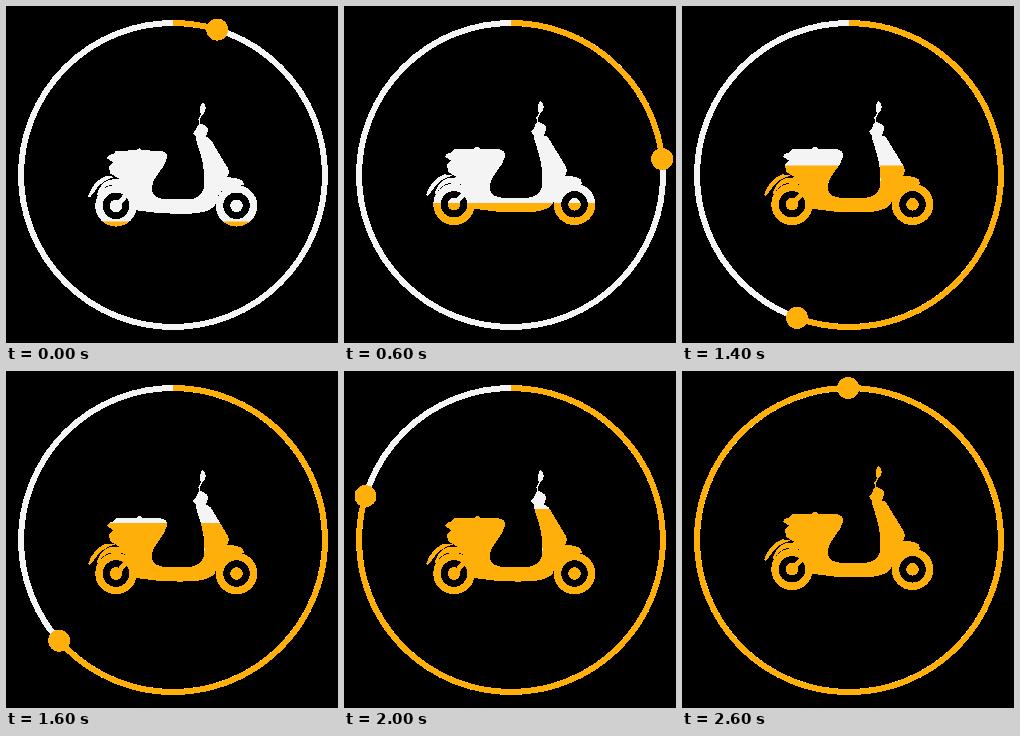
An HTML page for the animation above (2.8 s loop, 332x337 px).

```html
<!DOCTYPE html>
<html>
<head>
<meta charset="utf-8">
<title>Scooter progress ring</title>
<style>
  html, body { margin: 0; width: 100%; height: 100%; overflow: hidden; background: #000; }
  svg { display: block; shape-rendering: crispEdges; }
  .light { color: #f4f4f4; }
  .warm { color: #ffaf0a; }
  .line { fill: none; stroke: currentColor; }
</style>
</head>
<body>
<svg width="332" height="337" viewBox="0 0 332 337">
  <defs>
    <clipPath id="level"><rect id="fill" width="332" height="337"/></clipPath>
    <g id="wheel">
      <circle class="line" r="17" stroke-width="7.5"/>
      <circle r="6.3"/>
    </g>
    <g id="scooter" fill="currentColor">
      <!-- body, leg shield and front fender -->
      <path d="M101 152 Q102 148 107 148 L110 144.500 L130 144 Q131 142 134 142 L136 144 L155 144.500
        Q162 145.500 161 152 C159 162 145.500 172 145.500 182 C145.500 191 153 193.200 165 193.200 L184 193
        Q198 191 198.500 177 C199 164 196 151 191 137 L189.500 130 L187 127 Q190 124 192 118.500
        L195 117 L201 120.500 Q203 124 201 127 L200 130.500 Q205 132 208 139 L222 162 L223 166 L221 171
        Q232 171 237 175 L238 179 Q219 177 212 190 L209 199 Q205 205 190 207 Q160 209 130 204
        Q131 187 117 179.500 L104 178.500 Q97 181 92 189 L90.500 189 Q94 177 103 173.500 L113 172.500 L104 167
        L103 160 L107 156 Z"/>
      <!-- rear guard -->
      <path d="M82 190 Q87 175 100 169.500 L109 170.500 Q95 174 88 186 L84 191 Z"/>
      <!-- mirror -->
      <path d="M196.500 96.300 Q200 98 199.500 103 Q199 107 196 109 Q193 106 194 101 Q195 97 196.500 96.300 Z"/>
      <path class="line" d="M196 108 L193 113 L194 120" stroke-width="1.300"/>
      <path class="line" d="M110 200 L120 189" stroke-width="5"/>
      <use href="#wheel" x="110" y="199.500"/>
      <use href="#wheel" x="230.500" y="199.500"/>
    </g>
  </defs>

  <g class="light">
    <circle class="line" cx="167" cy="169" r="152" stroke-width="6"/>
    <use class="ride" href="#scooter"/>
  </g>
  <g class="warm">
    <path id="arc" class="line" stroke-width="6"/>
    <circle id="dot" r="11" fill="currentColor"/>
    <g clip-path="url(#level)"><use class="ride" href="#scooter"/></g>
  </g>
</svg>
<script>
  const STEP = 200;
  const CX = 167, CY = 169, R = 152;
  // One dial angle (degrees) and one fill height per step.
  const angles = [16.9, 34.6, 59.3, 84, 109.2, 137, 168.5, 200, 228.5, 257.5, 286.8, 316.6, 341.3, 359.7];
  const levels = [215.5, 209, 203, 197, 190, 182, 170.5, 159.5, 152, 145, 138, 124, 110, 94];
  const get = id => document.getElementById(id);
  const arc = get('arc'), dot = get('dot'), fill = get('fill');
  const scooters = document.querySelectorAll('.ride');

  // The scooter jolts down on every other step, gently at first.
  const bob = step => -1.2 + (step % 2 ? 0 : Math.min(4.2, 1.5 + step * 1.35));

  function draw(time) {
    const step = Math.floor(time / STEP) % angles.length;
    const a = angles[step] * Math.PI / 180;
    const x = CX + R * Math.sin(a), y = CY - R * Math.cos(a);
    arc.setAttribute('d', `M${CX} ${CY - R}A${R} ${R} 0 ${+(a > Math.PI)} 1 ${x} ${y}`);
    dot.setAttribute('cx', x);
    dot.setAttribute('cy', y);
    fill.setAttribute('y', levels[step]);
    for (const scooter of scooters) scooter.setAttribute('y', bob(step));
  }

  const start = performance.now();
  function tick() {
    draw(performance.now() - start);
    requestAnimationFrame(tick);
  }
  tick();
</script>
</body>
</html>
```
